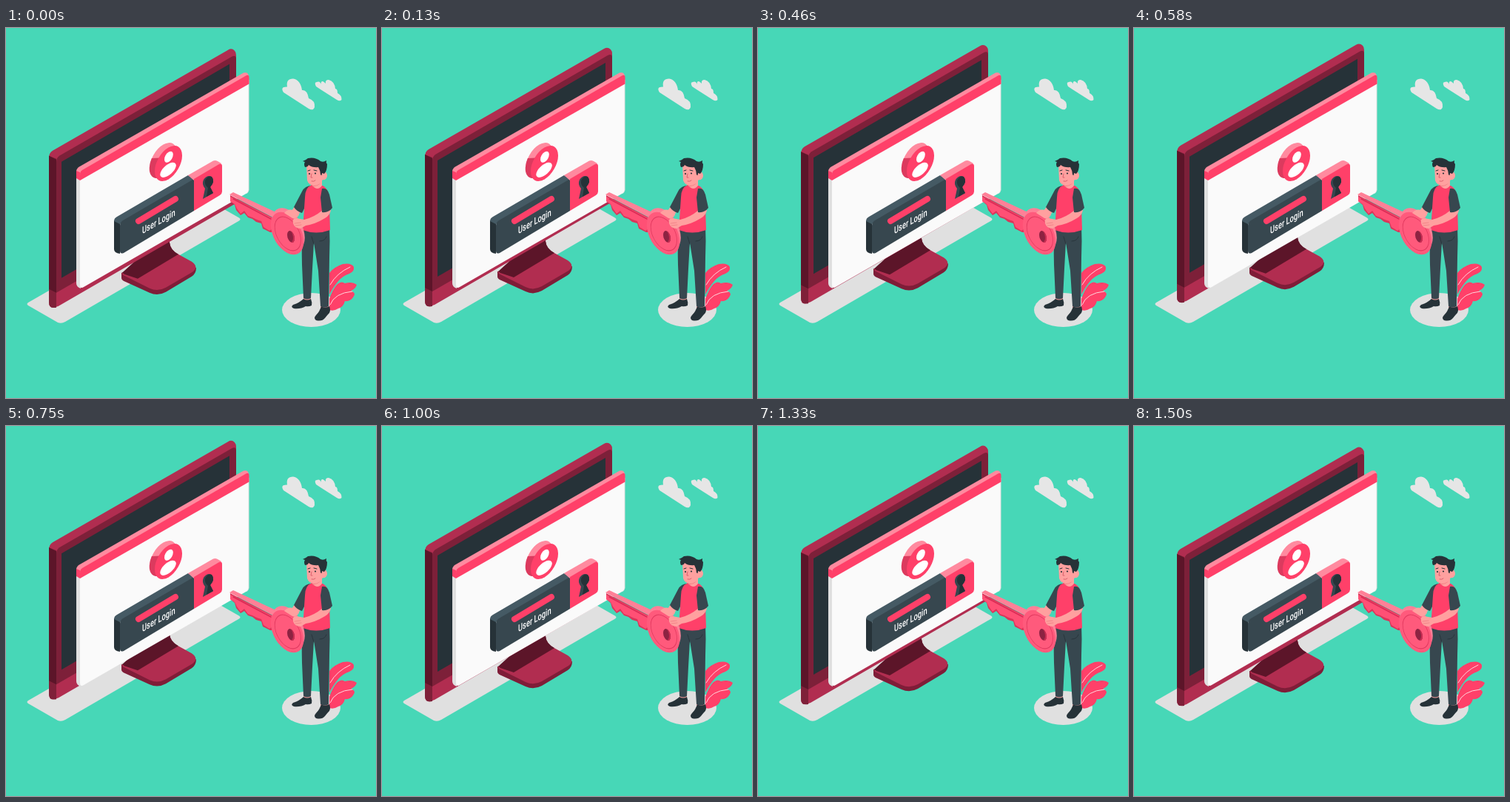
These frames come from a looping animation (500x500 px, 1.54 s). An HTML page:

```html
<!DOCTYPE html>
<html lang="en">
<head>
<meta charset="utf-8">
<title>User login</title>
<style>
  html, body { margin: 0; width: 100%; height: 100%; overflow: hidden; background: #47d7b7; }
  svg { display: block; width: 100%; height: 100%; }
  .pink { fill: #ff4069; }
  .light { fill: #ff8a9f; }
  .slate { fill: #37474f; }
  .ink { fill: #263238; }
  .skin { fill: #ffa09f; }
  .grey { fill: #e0e0e0; }
  .cloud { fill: #e6e6e6; }
  .line { fill: none; stroke-linecap: round; stroke-linejoin: round; }
</style>
</head>
<body>
<svg viewBox="0 0 500 500">
  <path class="grey" d="M30 371L272 232L315 256.500Q318 258.500 315 260.500L80 397Q75 400 70 398L30 375Q27 373 30 371Z"/>

  <g id="monitor">
    <!-- stand -->
    <path fill="#7f1d38" d="M156 330V337Q156 340 161 342L194 357Q205 362 216 356L251 335Q257 331 257 323Z"/>
    <path fill="#b12d50" d="M157 330L216 300L221 280V289Q222 299 231 304L251 315Q261 322 252 329L216 350Q205 356 194 351L160 334Q156 332 157 330Z"/>
    <path fill="#5c1529" d="M157 330L190 300L221 280V289Q222 299 233 305L178 338L160 332Z"/>
    <!-- body -->
    <path fill="#b12d50" d="M58 175Q58 168 63 165L300 29Q305 26 309 30Q311 32 311 36V236L71 375Q58 381 58 370Z"/>
    <path fill="#7f2039" d="M58 172L68 176V377Q58 379 58 370Z"/>
    <path fill="#5c1529" d="M58 172L68 177V357L58 352Z"/>
    <path fill="#7d2039" d="M68 180Q68 175 72 172L305 38Q311 35 311 41V217L68 357Z"/>
    <path class="ink" d="M75 180L302 48V206L75 337Z"/>
  </g>

  <!-- window -->
  <path class="grey" d="M95 195L101 197V352Q95 350 95 345Z"/>
  <path class="grey" d="M320 70H328.500V219Q328 222 325 224Z"/>
  <path fill="#fafafa" d="M100 200L327.500 70V219Q327 222 325 223.500L105 350Q100 353 100 347Z"/>
  <path class="light" d="M95 194Q95 190 99 187.500L321 60.500Q328 59 328 66L100 197Z"/>
  <path class="pink" d="M95 193L100 195V206L95 203Z"/>
  <path class="pink" d="M100 198Q100 194 103 192L325 64Q328.500 63 328.500 66V75.500L100 206Z"/>

  <!-- user badge -->
  <g transform="matrix(.866 -.5 0 1 212.5 179)">
    <circle class="light" r="21.4"/>
    <path fill="#dc3a5e" d="M-18 -12A21.4 21.4 0 0 0 0 21.4L8 29.5V0Z"/>
  </g>
  <g transform="matrix(.866 -.5 0 1 219.5 183)">
    <circle class="pink" r="21.4"/>
    <circle fill="#fff" cx=".5" cy="-8.5" r="6.8"/>
    <path fill="#fff" d="M-13 9C-12 -2 11 -2 12 9C10 19 -11 19 -13 9Z"/>
  </g>

  <!-- login bar -->
  <path class="ink" d="M146 260L154 263V305Q146 304 146 299Z"/>
  <path fill="#455a64" d="M146 261Q146 257 150 255L246 199L255 205L154 265Z"/>
  <path class="slate" d="M154 267Q154 263 158 260L254 204V247L159 304Q154 306 154 301Z"/>
  <path class="light" d="M246 199L280 179.500Q283 178.500 286 180L291 183L254 206Z"/>
  <path class="pink" d="M254 204L288 184Q292 182 292 187V221Q292 224 289 226L254 247Z"/>
  <path class="line" stroke="#ff4069" stroke-width="8" d="M179 261L229 231"/>
  <text transform="matrix(.69 -.39 0 1 184 278.500)" font-family="Roboto, sans-serif" font-weight="500" font-size="13.500" fill="#fff">User Login</text>
  <path class="slate" d="M266 231L269 217Q264 211 267 205Q272 198 278 201Q283 207 276 215L280 223Z"/>
  <path class="ink" d="M271 228L273 216Q268 212 269 206Q273 199 278 201Q283 207 276 215L280 223Z"/>

  <!-- clouds -->
  <path class="cloud" d="M375 87Q370 79 380 79.500Q378 68.500 388 68.500Q398 70 400 84Q407 83 409 95Q418 98 417 107Q415 112.500 409 109Z"/>
  <path class="cloud" d="M425 83L419 79Q416 73 420 73Q424 71 426 76Q425 72 428 72Q430 73 432 75Q431 70 436 70Q444 72 445 82Q448 82 448 88Q454 91 453.500 97Q451 99.500 447 97Z"/>

  <!-- plant -->
  <ellipse class="grey" cx="412.500" cy="381" rx="39.500" ry="23"/>
  <path class="pink" d="M437 360V331Q443 323 455 319Q467 317 470 323Q471 329 464 332Q455 335 449 342Q443 349 437 360Z"/>
  <path class="pink" d="M437 381V366Q441 354 447 347Q453 341 458 345Q468 342 474 347Q472 353 466 355Q474 358 469 364Q465 370 458 369Q456 377 449 379Q443 383 437 381Z"/>
  <path class="line" stroke="#ffd5dc" d="M438 347Q447 331 465 323M438 374Q444 358 468 356"/>

  <!-- legs -->
  <path class="skin" d="M402 362H412V370H402ZM425 372H436V380H425Z"/>
  <path class="ink" d="M402 366Q407 369 412 366Q414 371 413 375Q409 377 405 376Q398 380 389 379Q384 377 388 374Q397 371 402 366Z"/>
  <path class="ink" d="M426 376Q431 379 437 376Q439 381 437 385Q434 388 431 392Q427 397 419 395Q415 392 419 388Q424 383 426 376Z"/>
  <path class="slate" d="M402 266H437Q438 287 437 310L436 376Q430 379 425 376L422 328L416 290L414 325L412 365Q407 368 402 365L400 320Q399 290 402 266Z"/>
  <path class="line" stroke="#263238" stroke-width=".8" d="M416 292L413 282M433 282Q431 288 424 288"/>

  <!-- torso -->
  <path class="skin" d="M391 240L399 246Q394 256 389 259L380 257Q384 249 391 240Z"/>
  <path class="slate" d="M413 213Q404 213 400 221L389 242Q393 248 400 250L410 230Z"/>
  <path class="pink" d="M413 212Q404 216 404 229L401 273Q419 280 438 273L437 240Q438 218 428 213Z"/>
  <path class="skin" d="M414 205H427V213Q421 221 414 213Z"/>
  <path fill="#f27f85" d="M414 210Q421 211 425 206L424 211Q419 215 414 214Z"/>

  <!-- key -->
  <path fill="#d9365a" d="M303 226L364 258V276L357 276L347 271L345 264L338 262L333 258L327 256L322 250L317 253L311 246L309 239L303 234Z"/>
  <path fill="#ff5075" d="M303 228L362 258V270L356 274L348 269L345 261L339 259L333 256L327 254L322 247L317 251L312 244L309 238L303 234Z"/>
  <path fill="#ff8097" d="M302 225L307 222L367 250L361 256Z"/>
  <path class="line" stroke="#d92c55" stroke-width="1.500" d="M307 231L358 258"/>
  <g transform="matrix(.84 .43 0 1 381.500 272)">
    <circle fill="#ff8097" r="26.500"/>
  </g>
  <g transform="matrix(.84 .43 0 1 380 277.500)">
    <circle fill="#ff5a7c" r="26.500"/>
    <circle class="line" stroke="#e23a60" r="21" cx="1"/>
    <ellipse fill="#8d2342" rx="6" ry="7.500" cx="6" cy="2"/>
    <path fill="#c92e53" d="M6 -5.500A6 7.500 0 0 1 6 9.500A8 9 0 0 0 6 -5.500Z"/>
  </g>

  <!-- near arm and hands -->
  <path class="skin" d="M376 250Q382 243 389 247L396 252Q394 258 387 257Z"/>
  <path class="skin" d="M428 244L439 246Q438 253 431 257Q418 265 405 267L398 271Q390 271 388 264Q386 258 392 257L403 259Q416 256 428 246Z"/>
  <path class="line" stroke="#ed7d83" stroke-width=".8" d="M390 264L398 263M391 267L399 266"/>
  <path class="slate" d="M427 217Q434 215 437 225L441 243Q436 250 427 249L425 229Z"/>

  <!-- head -->
  <path class="skin" d="M406 185Q415 180 427 187L429 194Q434 194 434 200Q433 206 428 205Q424 213 416 213Q409 212 407 206Z"/>
  <path class="ink" d="M404 188Q402 184 404 181L401 180Q406 178 408 176Q418 174 425 180Q429 182 433 179Q432 182 434 184Q434 193 430 197L427 196Q427 201 425 198Q425 193 422 188Q414 189 409 185Q408 188 404 188Z"/>
  <circle class="ink" cx="410" cy="197" r="1.100"/>
  <circle class="ink" cx="418" cy="196.500" r="1.100"/>
  <path class="line" stroke="#263238" d="M408 193L411 192M416 192L420 193"/>
  <path class="line" stroke="#d9616d" d="M413 197L412 202L414 202M413 207Q416 208 418 206"/>
</svg>
<script>
  const LOOP = 1540, RISE = 9, LEAD = 30, REST = 1;
  const monitor = document.getElementById('monitor');

  // The monitor floats up and down at constant speed.
  function draw(now) {
    const phase = ((now + LEAD) % LOOP) / LOOP;
    const lift = RISE * (1 - Math.abs(2 * phase - 1));
    monitor.setAttribute('transform', `translate(0 ${REST - lift})`);
    requestAnimationFrame(draw);
  }
  draw(performance.now());
</script>
</body>
</html>
```
